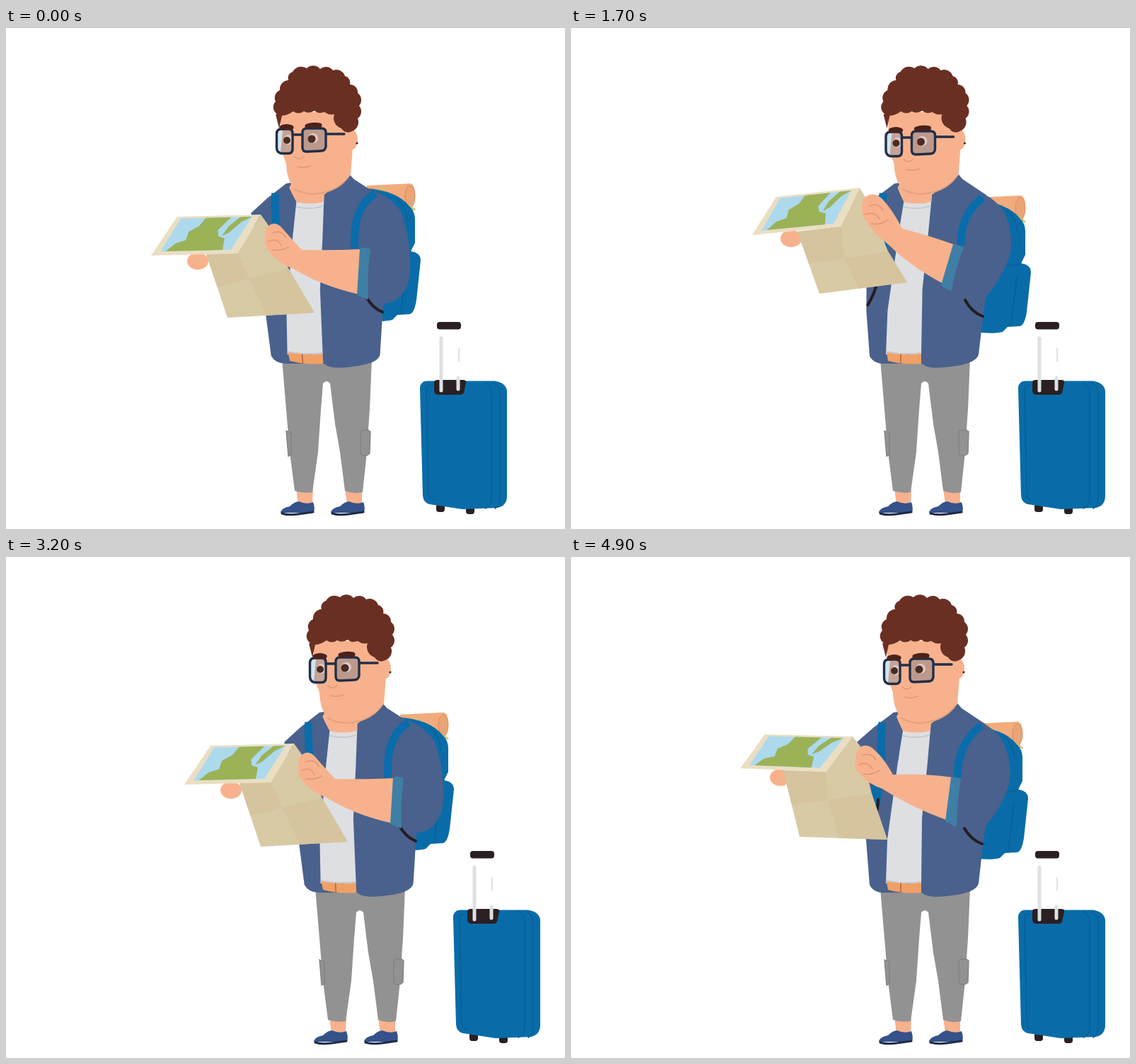
Recreate the animation shown at these times as an HTML page. Size 790 by 709 pixels, loop 5 s.

```html
<!DOCTYPE html>
<html lang="en">
<head>
<meta charset="utf-8">
<title>Traveller with a map</title>
<style>
html, body { margin: 0; width: 100%; height: 100%; overflow: hidden; background: #fff }
svg { display: block; width: 100%; height: 100% }
.skin { fill: #f7b28d } .jacket { fill: #49618c } .blue { fill: #096ca8 }
.dark { fill: #2a1f22 } .hair { fill: #6a2f23 } .grey { fill: #929292 }
.line { fill: none; stroke-linecap: round; stroke-linejoin: round }
.fold { stroke: #df9774; stroke-width: 1.6 }
.strap { stroke: #096cab; stroke-width: 11; stroke-linecap: butt }
.black { stroke: #241c22; stroke-width: 4 }
.rim { stroke: #222f47; stroke-width: 3.4 }
.rib { stroke: #0a5f97; stroke-width: 1.6 }
</style>
</head>
<body>
<svg viewBox="0 0 790 709">
<g id="stage">
  <!-- suitcase -->
  <g>
    <rect class="dark" x="655" y="673" width="12" height="12" rx="4"/>
    <rect class="dark" x="697" y="676" width="12" height="12" rx="4"/>
    <path class="blue" d="M632 510Q632 500 642 499.500L738 499.500Q754 502 755 514L755 662Q755 676 742 679L692 681L646 674Q637 672 636 662Z"/>
    <path class="line rib" d="M641 511Q641 505 650 505M641 511L644 660Q645 668 653 669M723 501Q733 506 733 516V668Q732 676 724 680M735 502Q745 507 745 517V668Q744 676 738 680"/>
    <path class="dark" d="M652 502Q652 498 657 498H693Q698 498 697 503L694 516Q693 519 688 519H657Q652 518 652 513Z"/>
    <path class="line" stroke="#dde1e4" stroke-width="5" d="M662 439V513M686 495V511"/>
    <path class="line" stroke="#e2e5e7" stroke-width="2.5" d="M687 454V471"/>
    <rect class="dark" x="656" y="416" width="34" height="10.500" rx="4"/>
  </g>

  <!-- legs -->
  <path class="skin" d="M457 652H481L480 674H460ZM526 652H550L550 674H529Z"/>
  <path class="grey" d="M437 468L443 540L448 600L455 655Q468 659 480 657L488 600L492 540L495 503Q500 497 505 503L512 560L519 600L526 655Q538 660 551 657L556 610L561 540L564 468Z"/>
  <path class="grey" stroke="#7f8084" stroke-width="1.3" d="M443 570L450 573V604L446 606ZM548 571Q556 566 562 571L561 602Q555 608 548 603Z"/>
  <g id="shoe">
    <path fill="#35528a" d="M435 685Q437 679 448 677Q455 670 461 670Q472 675 481 671Q484 679 482 686H435Z"/>
    <path class="line" stroke="#1f2a48" stroke-width="3" d="M437 687Q446 690 460 688L481 685"/>
  </g>
  <use href="#shoe" x="71"/>

  <!-- backpack -->
  <g id="pack">
    <path fill="#f2ab7c" d="M570 236L632 233Q639 236 638 252Q637 268 630 270L570 262Z"/>
    <ellipse cx="631" cy="251" rx="7" ry="15" fill="#eba475" stroke="#d98f5f"/>
    <path class="line" stroke="#d9c06a" stroke-width="3" d="M588 238Q596 246 612 254L637 270"/>
    <path class="blue" d="M570 240Q612 243 630 265Q639 273 638 288L638 317L632 329Q646 331 646 342L640 398Q637 417 630 418L613 419L606 426Q596 429 575 427Z"/>
    <path class="line rib" d="M600 330Q620 334 632 329M626 348L618 417M612 254Q626 266 627 285"/>
  </g>

  <!-- torso -->
  <g id="torso">
    <path class="jacket" d="M456 220L428 241L404 262L417 320V400L422 464Q428 476 445 475L496 475Q504 483 530 480Q573 476 576 462L583 400L600 300Q606 258 585 236L552 214L546 207Z"/>
    <path fill="#dedfe2" d="M468 244H508L503 300L496 370L495 462H445L447 400L458 320Z"/>
    <path class="line" stroke="#c3c5ca" stroke-width="1.5" d="M469 253Q488 258 506 252M446 458Q470 463 494 460"/>
    <path fill="#f0a066" d="M446 459Q470 464 495 461V475Q470 477 448 471Z"/>
    <path class="line" stroke="#a9683e" stroke-width="1.5" d="M466 462V474"/>
    <path class="skin" d="M466 215L546 200L545 209L509 236L508 246Q488 251 468 246L460 226Z"/>
    <path class="jacket" d="M456 220L469 246L462 290L447 260ZM546 207L509 236L507 290L560 260Z"/>
    <path class="line strap" d="M440 234Q436 266 441 312"/>
    <path class="blue" d="M424 318L441 312L437 350L427 362Z"/>
    <path class="line black" stroke-width="3" d="M434 343Q434 366 419 392"/>
  </g>
  <path class="jacket" id="sleeve"/>
  <path class="line black" id="hem"/>
  <path class="line strap" id="strap"/>

  <!-- head -->
  <g id="head">
    <ellipse class="skin" cx="548" cy="158" rx="8" ry="14"/>
    <circle class="dark" cx="555" cy="163" r="1.500"/>
    <path class="skin" d="M447 118L447 170L455 192Q456 216 466 226Q480 236 500 235Q528 232 546 208L549 170L547 120Z"/>
    <path class="line" stroke="#e49f7b" stroke-width="2" d="M467 228Q482 237 502 234Q528 230 542 212"/>
    <path class="hair" id="curls"/>
    <g id="face">
      <rect x="443" y="145" width="22" height="35" rx="6" fill="#c6a397"/>
      <rect x="479" y="144" width="33" height="33" rx="6" fill="#bd998c"/>
      <path fill="#cfe6ee" d="M444 151Q445 146 451 146L448 178Q443 176 443 170Z"/>
      <ellipse cx="459" cy="160" rx="6" ry="7" fill="#dccbc4"/>
      <ellipse cx="494" cy="158" rx="7" ry="7" fill="#dccbc4"/>
      <circle cx="457" cy="161" r="5" fill="#4a2c24"/>
      <circle cx="492" cy="159" r="5.500" fill="#4a2c24"/>
      <path class="line rim" d="M449 145H459Q465 145 465 151V173Q465 179.500 459 179.500H449Q442.500 178 442.500 171V151Q443 145 449 145ZM485 144H506Q512 144 512 150V170Q511 176 505 176L485 177Q479 177 479 171V150Q479 144 485 144ZM465 153H479"/>
      <path class="line rim" d="M513 152H538"/>
      <path class="line" stroke="#4b211a" stroke-width="7" d="M450 143Q457 140 463 143M486 141Q494 138 503 140"/>
      <path class="line fold" d="M468 184Q474 190 481 184M472 198Q480 201 490 197"/>
    </g>
  </g>

  <!-- map and arms -->
  <ellipse class="skin" id="farHand" rx="15" ry="12"/>
  <path fill="#d9caa6" id="sheet"/>
  <path fill="#d5c49e" id="checks"/>
  <path fill="#eadec3" id="top"/>
  <path fill="#add9ed" id="sea"/>
  <path fill="#9bb257" id="land"/>
  <path class="skin" id="arm"/>
  <path class="line fold" id="fingers"/>
  <path fill="#3f7fa6" id="cuff"/>
</g>
</svg>
<script>
const $ = id => document.getElementById(id);

// Three poses per moving part: map low, map to the left, map raised.
const parts = {
  pack: ['transform', 'translate(-13 -13)', 'translate(0 0)', 'translate(4 4)'],
  torso: ['transform', 'matrix(1 0 .052 1 -24.4 0)', 'matrix(1 0 0 1 0 0)', 'matrix(1 0 -.006 1 2.8 0)'],
  head: ['transform', 'translate(-12 0)', 'translate(0 0)', 'translate(1.5 0)'],
  face: ['transform', 'translate(-1 -2)', 'translate(0 0)', 'translate(1 2)'],
  farHand: ['transform', 'translate(318 330)', 'translate(296 312)', 'translate(311 298)'],
  sleeve: ['d',
    'M534 225Q586 228 606 262Q620 300 618 345Q615 378 592 388Q572 394 550 382L552 312L534 300Z',
    'M546 225Q592 230 611 262Q623 290 620 318Q611 352 585 382Q566 392 538 380L546 312L546 300Z',
    'M548 225Q596 231 614 264Q625 290 621 318Q611 352 585 382Q562 392 532 370L548 310L548 300Z'],
  hem: ['d', 'M557 382Q565 396 579 402', 'M556 384Q565 400 581 406', 'M557 385Q566 402 582 408'],
  strap: ['d', 'M569 234Q536 254 540 312', 'M580 238Q546 264 546 312', 'M582 240Q550 264 551 308'],
  arm: ['d',
    'M550 313Q510 315 465 314Q450 298 438 284Q428 272 418 280Q410 289 414 309Q428 332 452 340Q490 364 546 377Z',
    'M540 312Q500 306 455 308Q443 286 430 274Q418 262 407 270Q399 280 403 302Q420 322 440 328Q480 354 533 373Z',
    'M546 308Q508 294 468 284Q455 258 440 242Q428 230 416 239Q408 250 413 268Q428 292 448 306Q480 338 528 363Z'],
  fingers: ['d',
    'M424 290Q436 285 442 296M418 302Q430 296 436 308M424 314Q436 316 446 310',
    'M412 281Q424 276 431 287M407 294Q418 288 426 300M413 307Q426 309 436 302',
    'M422 252Q434 246 441 258M416 264Q428 258 436 270M424 277Q438 279 447 272'],
  cuff: ['d',
    'M547 312Q554 309 562 313Q557 348 559 384Q551 382 543 378Z',
    'M537 312Q544 310 551 314Q545 350 545 382Q537 379 529 374Z',
    'M540 306Q548 306 555 311Q542 342 538 372Q530 370 523 364Z'],
};
// Corners of the top panel, then left, bottom and right of the hanging sheet.
const corners = [
  '252 322 289 267 407 264 374 319 330 320 360 410 483 403 446 340 417 278',
  '239 299 274 251 398 254 360 304 300 302 323 396 447 400 425 335 409 268',
  '256 293 290 239 408 226 381 281 320 288 351 376 475 360 448 316 421 248'];
const seaUV = [.08, .1, .06, .95, .91, .95, .9, .1];
const landUV = [
  [.14, .1, .19, .3, .29, .38, .26, .6, .34, .74, .36, .95, .66, .95, .6, .62, .65, .46, .74, .4, .8, .1],
  [.91, .95, .82, .82, .75, .55, .69, .47, .7, .72, .77, .95]];
const curls = [449, 124, 441, 121, 440, 104, 446, 88, 458, 74, 464, 62, 484, 57, 503, 58, 521, 60, 538, 68,
  545, 80, 556, 92, 558, 110, 556, 128, 548, 146, 533, 142, 523, 122];

const pairs = a => a.flatMap((v, i) => i % 2 ? [] : [[v, a[i + 1]]]);
const poly = pts => 'M' + pts.map(p => p.join(' ')).join('L') + 'Z';
const lerp = (p, q, k) => p.map((v, i) => v + (q[i] - v) * k);
const ease = x => (x = Math.min(1, Math.max(0, x)), x * x * (3 - 2 * x));

function blend(a, b, k) {
  const to = b.match(/-?\d*\.?\d+/g);
  let i = 0;
  return a.replace(/-?\d*\.?\d+/g, n => +(+n + (to[i++] - n) * k).toFixed(3));
}

$('curls').setAttribute('d', pairs(curls).map(([x, y], i, all) => {
  if (!i) return `M${x} ${y}`;
  const r = Math.hypot(x - all[i - 1][0], y - all[i - 1][1]) * .68;
  return `A${r} ${r} 0 0 1 ${x} ${y}`;
}).join('') + 'Q516 124 509 119Q500 122 495 117Q487 122 480 118Q472 123 465 118Q456 124 449 124L445 142L440 122Z');

function drawMap(from, to, k) {
  const [p0, p1, p2, p3, left, low, tip, side, grip] =
    pairs(blend(corners[from], corners[to], k).split(' ').map(Number));
  const at = ([u, v]) => lerp(lerp(p0, p3, u), lerp(p1, p2, u), v);
  const patch = uv => poly(pairs(uv).map(at));
  const mid = lerp(left, low, .52);
  const foot = lerp(low, tip, .45), centre = lerp(mid, side, .45);
  $('sheet').setAttribute('d', poly([left, p3, p2, grip, side, tip, low]));
  $('checks').setAttribute('d', poly([left, p3, centre, mid]) + poly([centre, side, tip, foot]));
  $('top').setAttribute('d', poly([p0, p1, p2, p3]));
  $('sea').setAttribute('d', patch(seaUV));
  $('land').setAttribute('d', landUV.map(patch).join(''));
}

// start, end, pose before, pose after
const moves = [[50, 600, 0, 1], [1000, 1700, 1, 2], [2400, 3000, 2, 0]];

function draw(now) {
  const t = Math.floor(now % 5000 / 100) * 100, c = t % 4200;
  const [start, end, from, to] = moves.findLast(m => c >= m[0]) || moves[0];
  const k = ease((c - start) / (end - start));
  for (const id in parts) {
    const [attr, ...pose] = parts[id];
    $(id).setAttribute(attr, blend(pose[from], pose[to], k));
  }
  drawMap(from, to, k);
  const slide = -47 * Math.max(0, 1 - t / 600) ** 3;
  $('stage').setAttribute('transform', `translate(${slide} 0)`);
}

const begin = performance.now();
(function frame() {
  draw(performance.now() - begin);
  requestAnimationFrame(frame);
})();
</script>
</body>
</html>
```
